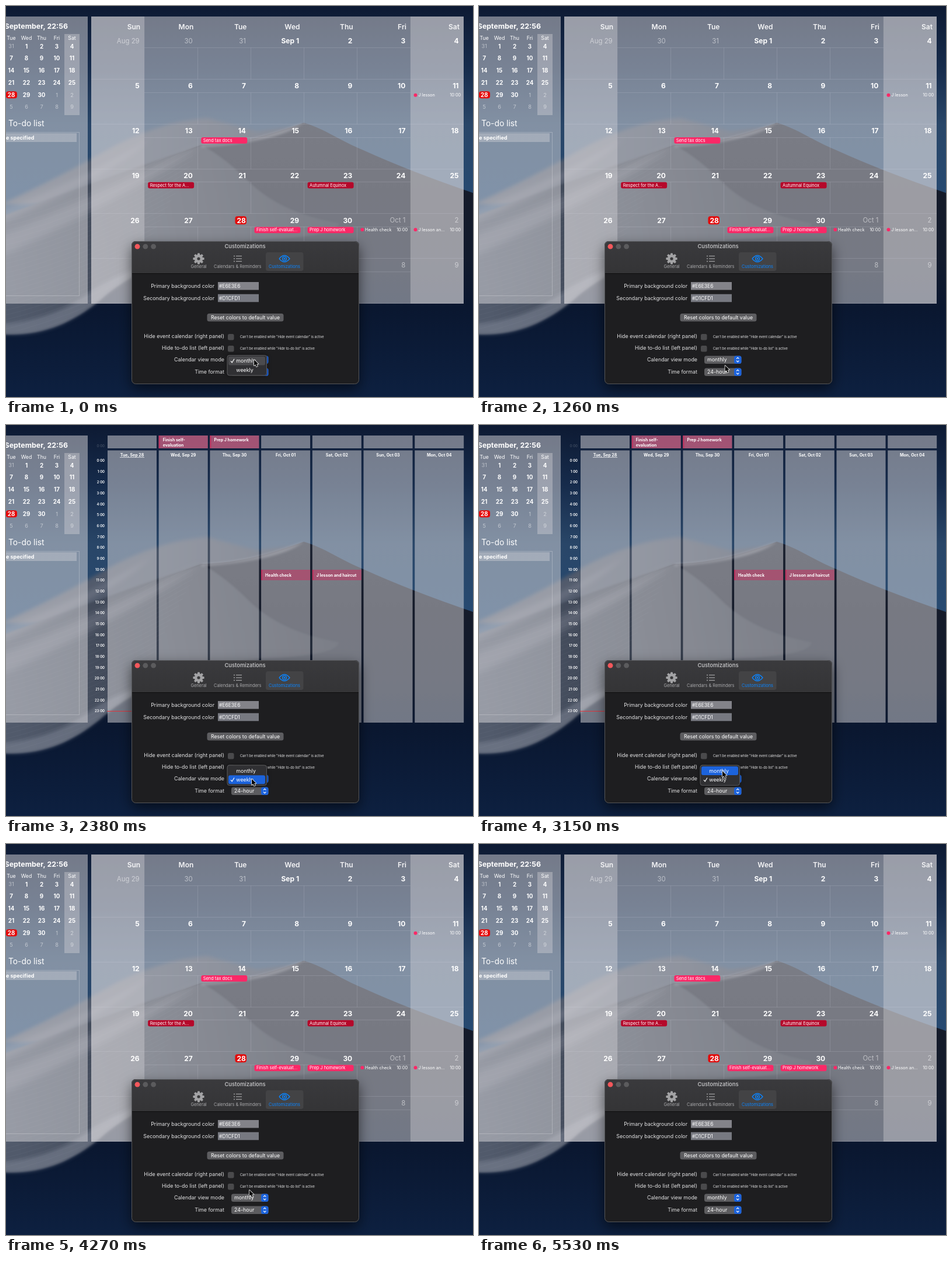
Animation, 800 px wide and 670 px high, one loop 5600 ms. Source, as an HTML page with a canvas:

```html
<!DOCTYPE html>
<html lang="en">
<head>
<meta charset="utf-8">
<style>
html, body { margin: 0; width: 100%; height: 100%; overflow: hidden; background: #0d1a33; }
canvas { display: block; width: 800px; height: 670px; }
</style>
</head>
<body>
<canvas id="stage" width="800" height="670"></canvas>
<script>
const W = 800, H = 670, LOOP = 5600, STEP = 70;
const FONT = 'Inter, Roboto, sans-serif';
const PINK = '#fb2867', CRIMSON = '#b5082a', BLUE = '#1c63dc', BUTTON = '#5d5d60';
const DAYS = ['Sun', 'Mon', 'Tue', 'Wed', 'Thu', 'Fri', 'Sat'];
const stage = document.getElementById('stage').getContext('2d');
let c = stage;

function layer(draw) {
  const cv = document.createElement('canvas');
  cv.width = W; cv.height = H;
  c = cv.getContext('2d');
  draw();
  c = stage;
  return cv;
}

function text(s, x, y, size, { align = 'left', weight = 400, color = '#fff' } = {}) {
  c.font = `${weight} ${size}px ${FONT}`;
  c.textAlign = align;
  c.textBaseline = 'alphabetic';
  c.fillStyle = color;
  c.fillText(s, x, y + size * 0.36);
}

function box(x, y, w, h, color, r = 0) {
  c.fillStyle = color;
  c.beginPath();
  c.roundRect(x, y, w, h, r);
  c.fill();
}

function dot(x, y, r, color) {
  c.fillStyle = color;
  c.beginPath();
  c.arc(x, y, r, 0, 7);
  c.fill();
}

function line(color, width, ...points) {
  c.strokeStyle = color;
  c.lineWidth = width;
  c.beginPath();
  points.forEach(([x, y], i) => i ? c.lineTo(x, y) : c.moveTo(x, y));
  c.stroke();
}

function gradient(x0, y0, x1, y1, ...stops) {
  const g = c.createLinearGradient(x0, y0, x1, y1);
  stops.forEach(([p, color]) => g.addColorStop(p, color));
  return g;
}

function wallpaper() {
  c.fillStyle = gradient(0, 0, 0, 340, [0, '#0d1a33'], [0.3, '#162b4b'], [0.6, '#294668'], [1, '#264a72']);
  c.fillRect(0, 0, W, H);

  const fill = (path, style, blur = 0.6) => {
    c.filter = `blur(${blur}px)`;
    c.fillStyle = style;
    c.fill(new Path2D(path));
    c.filter = 'none';
  };
  fill('M-20 345 Q90 295 170 248 Q260 198 345 192 L430 215 L510 205 V340 H-20Z',
    gradient(0, 0, 520, 0, [0, '#5b6373'], [0.5, '#4b5567'], [1, '#313c50']), 3);
  fill('M510 200 C545 210 575 232 612 247 Q700 287 820 327 V690 H-20 V372 Q170 298 335 238 C405 236 455 220 510 200Z',
    gradient(0, 200, 0, H, [0, '#1b2130'], [0.25, '#151b2a'], [0.5, '#121b2d'], [0.68, '#0a1730'], [1, '#0d2040']));
  fill('M335 238 Q180 290 -20 365 V562 C60 568 110 545 160 505 C230 442 330 410 440 400 Q570 395 570 372 Q470 355 415 300 Q375 260 335 238Z',
    gradient(0, 430, 560, 330, [0, '#515a6b'], [0.45, '#3b4352'], [1, '#1d2433']), 1.5);
  fill('M-10 395 Q160 320 335 238 Q210 325 -10 430Z', 'rgba(140,145,158,.35)', 6);
  fill('M-10 350 Q150 290 250 225 Q180 290 -10 372Z', 'rgba(140,145,158,.35)', 5);
  fill('M335 238 C405 236 455 220 510 200 Q470 232 335 242Z', 'rgba(130,135,148,.6)', 2);
  fill('M-10 562 C60 568 110 545 160 505 Q210 458 300 428 Q190 452 130 500 Q70 540 -10 545Z',
    'rgba(135,142,158,.45)', 3);

  const clip = new Path2D('M-20 365 Q180 290 335 238 L220 450 L100 545 L-20 562Z');
  c.save();
  c.clip(clip);
  c.strokeStyle = 'rgba(190,195,205,.05)';
  for (let i = 0; i < 26; i++) {
    const y = 372 + i * 8;
    c.beginPath();
    c.moveTo(-10, y);
    c.quadraticCurveTo(140, y - 35, 320, y - 140);
    c.stroke();
  }
  c.restore();
}

const panel = (x, y, w, h) => box(x, y, w, h, 'rgba(230,227,230,.47)');
const weekend = (x, y, w, h) => box(x, y, w, h, 'rgba(225,222,225,.34)');

function sidebar() {
  panel(0, 18, 140, 492);
  text('September, 22:56', 106, 35, 12.4, { align: 'right', weight: 700 });
  weekend(100, 48, 26, 139);
  for (let col = 0; col < 5; col++) {
    const x = 9 + col * 26;
    text(DAYS[col + 2], x, 55, 8.8, { align: 'center' });
    for (let row = 0; row < 6; row++) {
      const n = row * 7 + col, y = 69 + row * 20.8;
      const day = n === 0 ? 31 : n > 30 ? n - 30 : n;
      const muted = n === 0 || n > 30;
      if (n === 28) box(0, y - 6, 19, 12, '#e60808', 4);
      text(day, x, y, muted ? 9.2 : 9.8, {
        align: 'center', weight: muted ? 400 : 700, color: muted ? 'rgba(255,255,255,.5)' : '#fff'
      });
    }
  }
  text('To-do list', 4, 201.5, 13.8);
  c.strokeStyle = 'rgba(230,230,235,.3)';
  c.lineWidth = 1;
  c.strokeRect(-5, 216.5, 130.5, 280);
  weekend(0, 218, 121, 15);
  text('e specified', 0, 225.5, 9, { weight: 700 });
}

const colW = 638 / 7, rowH = 76.8;

function pill(col, row, label, color) {
  const x = 146 + col * colW + 6, y = 71.3 + row * rowH;
  box(x, y, 79, 10.8, color, 3);
  text(label, x + 3.5, y + 5.2, 7.4);
}

function timed(col, row, label) {
  const x = 146 + col * colW, y = 76 + row * rowH;
  dot(x + 8.6, y, 3, PINK);
  text(label, x + 13.3, y, 7.3);
  text('10:00', x + 86.3, y, 7.3, { align: 'right' });
}

function monthView() {
  panel(146, 18, 638, 492);
  weekend(146, 18, colW, 492);
  weekend(784 - colW, 18, colW, 492);
  const faint = 'rgba(225,225,235,.16)';
  for (let row = 0; row < 6; row++) {
    const top = Math.round(71 + row * rowH) + 0.5, bottom = top + 54;
    line(faint, 1, [237, top], [693, top]);
    line(faint, 1, [146, bottom], [784, bottom]);
    for (let col = 2; col < 6; col++) {
      const x = Math.floor(146 + col * colW) + 0.5;
      line(faint, 1, [x, top], [x, bottom]);
    }
  }
  DAYS.forEach((day, col) => {
    const right = 146 + (col + 1) * colW;
    text(day, right - 7, 35.5, 12, { align: 'right', weight: 600, color: '#f4f4f6' });
    for (let row = 0; row < 6; row++) {
      const n = row * 7 + col - 2, y = 60 + row * rowH;
      const muted = n < 1 || n > 30;
      let label = n < 1 ? n + 31 : n > 30 ? n - 30 : n;
      if (n === -2) label = 'Aug 29';
      if (n === 1) label = 'Sep 1';
      if (n === 31) label = 'Oct 1';
      if (n === 28) box(right - 27, y - 7, 19.5, 14, '#e20a0a', 4);
      text(label, right - 8.5, y, muted ? 11.4 : 12, {
        align: 'right', weight: muted ? 400 : 700, color: muted ? 'rgba(255,255,255,.52)' : '#fff'
      });
    }
  });
  pill(2, 2, 'Send tax docs', PINK);
  pill(1, 3, 'Respect for the A...', CRIMSON);
  pill(4, 3, 'Autumnal Equinox', CRIMSON);
  pill(3, 4, 'Finish self-evaluat...', PINK);
  pill(4, 4, 'Prep J homework', PINK);
  timed(6, 1, 'J lesson');
  timed(5, 4, 'Health check');
  timed(6, 4, 'J lesson an...');
}

const weekX = col => 174 + col * 87.7;

function weekEvent(col, y, h, lines) {
  const x = weekX(col);
  box(x, y, 84, h, 'rgba(195,55,100,.58)');
  box(x, y, 2, h, '#c0325f');
  lines.forEach((s, i) => text(s, x + 7, y + (h < 20 ? 9 : 7) + i * 9, 7, { weight: 700 }));
}

function weekView(withEvents) {
  const top = withEvents ? 43.5 : 18;
  const titles = ['Tue, Sep 28', 'Wed, Sep 29', 'Thu, Sep 30', 'Fri, Oct 01', 'Sat, Oct 02', 'Sun, Oct 03', 'Mon, Oct 04'];
  titles.forEach((title, col) => {
    const x = weekX(col), y = top + 8;
    panel(x, top, 84, 510 - top);
    if (withEvents) panel(x, 18, 84, 22);
    text(title, x + 42, y, 7, { align: 'center', weight: 700 });
    if (col === 0) line('#fff', 0.7, [x + 21, y + 4], [x + 63, y + 4]);
  });
  const first = withEvents ? 61 : 36;
  for (let hour = 0; hour < 24; hour++) {
    text(hour + ':00', 169, first + hour * (490.3 - first) / 23, 5.9, { align: 'right', weight: 600 });
  }
  if (!withEvents) return;
  text('0:00', 169, 36, 5.9, { align: 'right', weight: 600, color: 'rgba(255,255,255,.18)' });
  weekEvent(1, 18, 22, ['Finish self-', 'evaluation']);
  weekEvent(2, 18, 22, ['Prep J homework']);
  weekEvent(3, 248, 18, ['Health check']);
  weekEvent(4, 248, 18, ['J lesson and haircut']);
  line('#e0343c', 1, [173, 490.5], [258, 490.5]);
}

function gear(x, y) {
  c.save();
  c.translate(x, y);
  for (let i = 0; i < 8; i++) {
    c.rotate(Math.PI / 4);
    box(-2, -9.6, 4, 6, '#a3a3a5', 1);
  }
  c.restore();
  dot(x, y, 7.2, '#a3a3a5');
  dot(x, y, 2.6, '#39393b');
}

function eye(x, y) {
  c.strokeStyle = '#0a84ff';
  c.lineWidth = 1.4;
  c.beginPath();
  c.moveTo(x - 9, y);
  c.quadraticCurveTo(x, y - 11, x + 9, y);
  c.quadraticCurveTo(x, y + 11, x - 9, y);
  c.stroke();
  c.beginPath();
  c.arc(x, y, 3.4, 0, 7);
  c.stroke();
  dot(x, y, 1.5, '#0a84ff');
}

function settings() {
  c.save();
  c.shadowColor = 'rgba(0,0,0,.55)';
  c.shadowBlur = 22;
  c.shadowOffsetY = 8;
  box(215, 403, 390, 245, '#1e1e20', 7);
  c.restore();
  box(215, 403, 390, 55, gradient(0, 403, 0, 458, [0, '#3a3a3d'], [1, '#343436']), [7, 7, 0, 0]);
  line('#0c0c0d', 1, [215, 458.5], [605, 458.5]);
  c.strokeStyle = '#555659';
  c.lineWidth = 1;
  c.beginPath();
  c.roundRect(215.5, 403.5, 389, 244, 7);
  c.stroke();
  ['#f4575b', '#5b5b5d', '#5b5b5d'].forEach((color, i) => dot(225 + i * 13.8, 412.2, 4.4, color));
  text('Customizations', 409.5, 412, 9.3, { align: 'center', weight: 600, color: '#bdbdbf' });

  box(445, 422, 64.5, 32, '#434345', 4);
  gear(330, 433);
  for (let i = 0; i < 3; i++) {
    const y = 428.5 + i * 4.5;
    dot(391, y, 1, '#a3a3a5');
    line('#a3a3a5', 1.2, [394, y], [404, y]);
  }
  eye(477, 433);
  const tab = (s, x, color = '#a9a9ab') => text(s, x, 446, 7.4, { align: 'center', color });
  tab('General', 330);
  tab('Calendars & Reminders', 396.7);
  tab('Customizations', 477, '#0a84ff');

  const label = (s, x, y) => text(s, x, y, 8.9, { align: 'right', color: '#e4e4e5' });
  [['Primary', '#E6E3E6'], ['Secondary', '#D1CFD1']].forEach(([name, value], i) => {
    const y = 480 + i * 20.7;
    label(name + ' background color', 357, y);
    box(363, y - 7, 70, 13.5, i ? '#777981' : '#838389');
    text(value, 365, y, 8.5);
  });
  box(344.5, 527, 131, 13.5, BUTTON, 3.5);
  text('Reset colors to default value', 410, 533.5, 8.8, { align: 'center' });

  label('Hide event calendar (right panel)', 374, 566);
  label('Hide to-do list (left panel)', 374, 586);
  label('Calendar view mode', 374, 606);
  label('Time format', 374, 627);
  ['event calendar', 'to-do list'].forEach((name, i) => {
    const y = 567 + i * 20;
    box(380, y - 5, 10.5, 10.5, '#4a4a4c', 2.5);
    text(`Can't be enabled while "Hide ${name}" is active`, 401, y, 5.6, { color: '#e4e4e5' });
  });
}

function select(label, y) {
  box(386, y - 6.5, 63.5, 13.5, BUTTON, 3.5);
  box(437, y - 6.5, 12.5, 13.5, BLUE, 3.5);
  line('#fff', 1.2, [441, y - 1.3], [443.2, y - 3.6], [445.4, y - 1.3]);
  line('#fff', 1.2, [441, y + 1.7], [443.2, y + 4], [445.4, y + 1.7]);
  text(label, 391, y, 8.9);
}

function menu(top, checked, hovered, hoverColor) {
  c.save();
  c.shadowColor = 'rgba(0,0,0,.5)';
  c.shadowBlur = 6;
  box(378.5, top, 68.5, 35.5, '#303033', 4);
  c.restore();
  c.strokeStyle = '#58585b';
  c.lineWidth = 1;
  c.beginPath();
  c.roundRect(379, top + 0.5, 67.5, 34.5, 4);
  c.stroke();
  ['monthly', 'weekly'].forEach((name, i) => {
    const y = top + 10 + i * 15.3;
    if (i === hovered) box(381, y - 7.5, 63, 15, hoverColor, 3);
    text(name, 394.3, y, 8.9);
    if (i === checked) line('#fff', 1.2, [385, y + 0.3], [387.2, y + 3], [391, y - 3.3]);
  });
}

const pathKeys = [
  [0, 425, 606], [280, 425, 606], [700, 422, 625.5], [1120, 422, 625.5],
  [1400, 421, 606.5], [2450, 421, 606.5], [2940, 417, 593], [LOOP, 417, 593]
];

function cursorAt(t) {
  const i = pathKeys.findIndex(k => k[0] > t);
  const [t0, x0, y0] = pathKeys[i - 1], [t1, x1, y1] = pathKeys[i];
  const p = (t - t0) / (t1 - t0), e = p * p * (3 - 2 * p);
  return [x0 + (x1 - x0) * e, y0 + (y1 - y0) * e];
}

function pointer(x, y) {
  c.save();
  c.translate(x, y);
  const arrow = new Path2D('M0 0V10.3L2.4 8.2L4 12L5.9 11.2L4.3 7.5H7.5Z');
  c.lineJoin = 'round';
  c.lineWidth = 1.6;
  c.strokeStyle = '#f4f4f4';
  c.stroke(arrow);
  c.fillStyle = '#050505';
  c.fill(arrow);
  c.restore();
}

let views;
function buildViews() {
  const scene = calendar => layer(() => { wallpaper(); sidebar(); calendar(); settings(); });
  views = {
    month: scene(monthView),
    week: scene(() => weekView(false)),
    events: scene(() => weekView(true))
  };
}

function render(t) {
  const weekly = t >= 1400 && t < 4200;
  const view = !weekly ? 'month' : t < 1750 ? 'week' : 'events';
  const [x, y] = cursorAt(t);
  c.drawImage(views[view], 0, 0);
  select(t >= 1610 && t < 4200 ? 'weekly' : 'monthly', 606);
  select('24-hour', 627);
  if (t < 1120) menu(598, 0, y > 615 ? 1 : 0, y > 615 ? BLUE : '#4b4b4e');
  if (t >= 2170 && t < 3780) menu(582.5, 1, y > 600 ? 1 : 0, BLUE);
  if (t < 5040) pointer(x, y);
}

buildViews();
const start = performance.now();
function tick() {
  const t = (performance.now() - start) % LOOP;
  render(Math.floor(t / STEP) * STEP);
  requestAnimationFrame(tick);
}
render(0);
requestAnimationFrame(tick);
</script>
</body>
</html>
```
